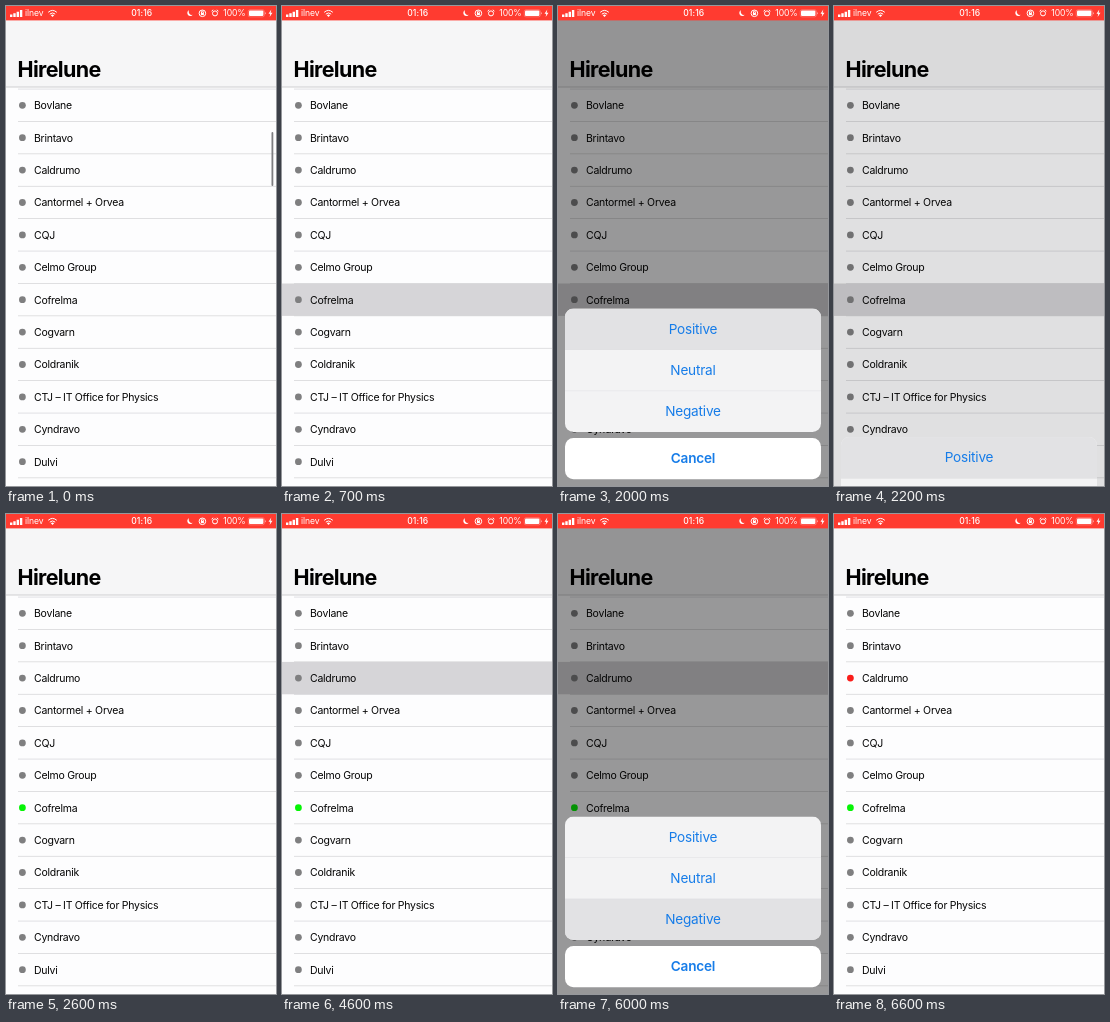
Write an HTML page that moves like this. It is 270 by 480 pixels and loops after 8 s.

```html
<!DOCTYPE html>
<html lang="en">
<head>
<meta charset="utf-8">
<title>Company ratings</title>
<style>
  html, body { margin: 0; width: 100%; height: 100%; overflow: hidden; background: #fdfdfe; }
  svg { display: block; width: 100vw; height: 100vh; font-family: Inter, Roboto, sans-serif; }
  .row text { font-size: 10.5px; letter-spacing: -.26px; fill: #050505; }
  .status text { font-size: 8.6px; fill: #fff; letter-spacing: -.1px; }
  .status .clock { font-weight: 500; letter-spacing: .1px; text-anchor: middle; }
  .status path, .status circle { fill: none; stroke: #fff; stroke-width: 1; }
  .status .solid { fill: #fff; stroke: none; }
  .title { font-size: 21.5px; font-weight: 700; letter-spacing: -.65px; }
  .sheet text { font-size: 13.6px; letter-spacing: -.2px; fill: #167ce8; text-anchor: middle; }
  .sheet .cancel { font-weight: 600; }
</style>
</head>
<body>
<svg viewBox="0 0 270 480" preserveAspectRatio="none">
  <defs>
    <clipPath id="panel"><rect x="7" y="302.5" width="256" height="123.6" rx="8.5"/></clipPath>
  </defs>
  <rect width="270" height="480" fill="#fdfdfe"/>
  <rect y="14" width="270" height="67" fill="#f6f6f7"/>
  <rect y="80.5" width="270" height="1" fill="#cfcfd2"/>
  <rect x="12" y="82.7" width="258" height=".7" fill="#d3d3d6"/>
  <text class="title" x="11.5" y="70.8">Hirelune</text>
  <g id="rows"></g>
  <rect id="scrollbar" x="265.5" y="126" width="1.8" height="54" rx=".9" fill="#7d7d80"/>
  <rect id="dim" width="270" height="480"/>

  <g class="status">
    <rect width="270" height="14.4" fill="#ff3b30"/>
    <path class="solid" d="M4 8.5h2.4v2.5h-2.4zM7.3 7.2h2.4v3.8h-2.4zM10.6 5.7h2.4v5.3h-2.4zM13.9 4h2.4v7h-2.4z"/>
    <text x="19" y="10.4">ilnev</text>
    <path d="M42.2 6.3q4.3 -3.8 8.6 0M43.8 8.1q2.7 -2.3 5.4 0" stroke-width="1.2"/>
    <path class="solid" d="M44.9 9.2q1.6 -1.2 3.2 0l-1.6 1.8z"/>
    <text class="clock" x="135.8" y="10.4">01:16</text>
    <path class="solid" d="M183 4.3a3 3 0 1 0 3.7 4.5a3.2 3.2 0 0 1 -3.7 -4.5z"/>
    <circle cx="196.4" cy="7.3" r="3.3" stroke-width=".8"/>
    <path class="solid" d="M194.9 6.9h3v2.2h-3z"/>
    <path d="M195.5 7v-1a.9 .9 0 0 1 1.8 0v1" stroke-width=".6"/>
    <circle cx="209" cy="7.4" r="2.5" stroke-width="1.6"/>
    <path d="M205.6 5.2l1.6 -1.4M212.4 5.2l-1.6 -1.4" stroke-width=".9"/>
    <text x="217.3" y="10.4">100%</text>
    <rect x="242.2" y="3.7" width="16.2" height="7.2" rx="1.9" fill="none" stroke="#fff" stroke-opacity=".4" stroke-width=".6"/>
    <rect x="243" y="4.6" width="14.4" height="5.4" rx="1" fill="#fff"/>
    <path class="solid" d="M259.4 6.1q1.2 1.2 0 2.4z"/>
    <path class="solid" d="M265.3 3.6l-2.8 4.2h1.8l-.7 3.2 2.9 -4.2h-1.9z"/>
  </g>

  <g id="sheet" class="sheet">
    <g id="options" clip-path="url(#panel)">
      <rect x="7" y="302.5" width="256" height="123.6" fill="#f3f3f4"/>
    </g>
    <rect x="7" y="432" width="256" height="41.2" rx="8.5" fill="#fff"/>
    <text class="cancel" x="135" y="457.4">Cancel</text>
  </g>
</svg>
<script>
const LOOP = 8000, STEP = 100;
const ROW = 32.4, LIST_TOP = 83.1, CELL = 41.2, SHEET_TOP = 302.5, SHEET_TRAVEL = 180;
const companies = ['Bovlane', 'Brintavo', 'Caldrumo', 'Cantormel + Orvea', 'CQJ', 'Celmo Group',
  'Cofrelma', 'Cogvarn', 'Coldranik', 'CTJ – IT Office for Physics', 'Cyndravo', 'Dulvi'];
const ratings = [
  { row: 6, option: 0, color: '#06f406', tap: 700, choose: 2000 },
  { row: 2, option: 2, color: '#fa1d1a', tap: 4600, choose: 6000 },
];

const byId = id => document.getElementById(id);
function add(parent, tag, attrs, text = '') {
  const node = document.createElementNS('http://www.w3.org/2000/svg', tag);
  for (const key in attrs) node.setAttribute(key, attrs[key]);
  node.textContent = text;
  return parent.appendChild(node);
}

const rows = companies.map((name, i) => {
  const top = LIST_TOP + i * ROW, middle = top + ROW / 2;
  const group = add(byId('rows'), 'g', { class: 'row' });
  const highlight = add(group, 'rect', { y: top, width: 270, height: ROW, fill: '#d6d5d8' });
  add(group, 'rect', { x: 12, y: top + ROW - .4, width: 258, height: .7, fill: '#d3d3d6' });
  const dot = add(group, 'circle', { cx: 16.4, cy: middle, r: 3.4 });
  add(group, 'text', { x: 28, y: middle + 3.8 }, name);
  return { highlight, dot };
});

const options = ['Positive', 'Neutral', 'Negative'].map((label, i) => {
  const y = SHEET_TOP + i * CELL;
  const cell = add(byId('options'), 'rect', { x: 7, y, width: 256, height: CELL, fill: '#e2e2e4' });
  if (i) add(byId('options'), 'rect', { x: 7, y: y - .2, width: 256, height: .4, fill: '#d9d9dc' });
  add(byId('options'), 'text', { x: 135, y: y + 25.4 }, label);
  return cell;
});

const clamp = v => Math.min(1, Math.max(0, v));
// Critically damped spring from 0 to 1.
function spring(ms) {
  const x = Math.max(0, ms) * .0228;
  return 1 - (1 + x) * Math.exp(-x);
}

function draw(time) {
  const t = Math.floor(time % LOOP / STEP) * STEP;
  let shown = 0;
  rows.forEach(row => {
    row.dot.setAttribute('fill', '#7f7f80');
    row.highlight.setAttribute('opacity', 0);
  });
  options.forEach(cell => cell.setAttribute('opacity', 0));

  for (const { row, option, color, tap, choose } of ratings) {
    if (t < tap) continue;
    const closed = choose + 500;
    if (t < closed) shown = spring(t - tap - 35) * (1 - spring(t - choose - 90));
    else rows[row].dot.setAttribute('fill', color);
    rows[row].highlight.setAttribute('opacity', clamp((choose + 600 - t) / 200));
    if (t >= choose && t < closed) options[option].setAttribute('opacity', 1);
  }

  byId('scrollbar').setAttribute('opacity', clamp((400 - t) / 300));
  byId('dim').setAttribute('opacity', .4 * shown);
  byId('sheet').setAttribute('transform', `translate(0 ${SHEET_TRAVEL * (1 - shown)})`);
}

const start = performance.now();
function tick() {
  draw(performance.now() - start);
  requestAnimationFrame(tick);
}
tick();
</script>
</body>
</html>
```
